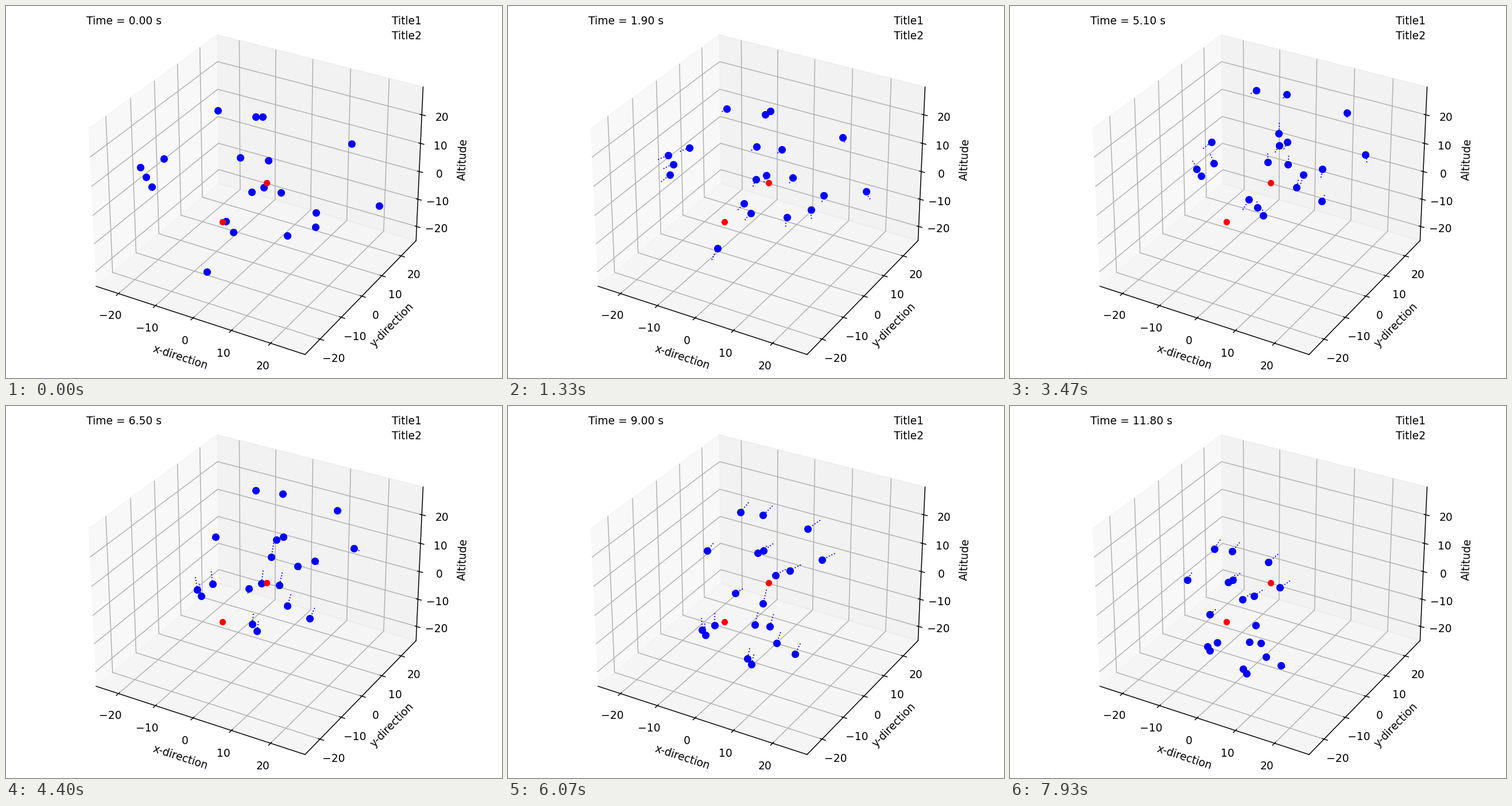
Recreate the animation shown at these times as a matplotlib script. Size 864 px wide and 648 px high, loop 8000 ms.

```python
import numpy as np
import matplotlib.pyplot as plt
from matplotlib.animation import FuncAnimation

WIDTH, HEIGHT, DPI = 864, 648, 135
LOOP_MS = 8000
SUBFRAMES = 2       # drawn frames per simulated step
STEPS = 120
STEP = 0.1          # simulated seconds
TRAIL_STEPS = 8
HALF_RANGE = 27.4
MIDDLE = (1.25, 0.57, 2.17)
WAYPOINT_TIMES = (0, 1.9, 3.7, 6.5, 9.0, 10.7, 11.8)


class Swarm:
    """Agents that share one smooth drift while their formation contracts."""

    def __init__(self, start, drift, decay):
        self.start = np.array(start, float)
        self.centre = self.start.mean(axis=0)
        # one polynomial per coordinate, through all waypoints
        waypoints = np.vstack([(0, 0), drift])
        self.path = np.polyfit(WAYPOINT_TIMES, waypoints,
                               len(WAYPOINT_TIMES) - 1)
        self.decay = decay

    def positions(self, t):
        drift = np.array([np.polyval(c, t) for c in self.path.T])
        rate, growth = self.decay
        spread = np.exp(-rate * t - growth * t * t)
        return self.centre + drift + spread * (self.start - self.centre)


swarms = [
    Swarm(start=[(369, 182), (447, 193), (602, 240), (449, 316), (428, 324),
                 (650, 348), (539, 385), (490, 400), (254, 315), (350, 463)],
          drift=[(0, -21), (19, -56), (31, -88),
                 (-8, -64), (-47, -31), (-66, -13)],
          decay=(0.0763, 0)),
    Swarm(start=[(435, 193), (408, 264), (457, 269), (275, 266), (234, 281),
                 (244, 298), (479, 325), (540, 360), (383, 375), (396, 394)],
          drift=[(28, -23), (44, -23), (45, 31),
                 (33, 99), (26, 125), (22, 125)],
          decay=(0.062, 0.001)),
]

# positions of every agent at every simulated step
history = np.array([np.vstack([swarm.positions(n * STEP) for swarm in swarms])
                    for n in range(STEPS)])

fig = plt.figure(figsize=(WIDTH / DPI, HEIGHT / DPI), dpi=DPI)
ax = fig.add_axes([0, 0, 1, 1], projection="3d")
names = ("x-direction", "y-direction", "Altitude")
for axis, name, mid in zip("xyz", names, MIDDLE):
    ax.set(**{f"{axis}lim": (mid - HALF_RANGE, mid + HALF_RANGE),
              f"{axis}ticks": range(-20, 21, 10),
              f"{axis}label": name})
clock = ax.text2D(0.05, 0.95, "", transform=ax.transAxes)
for y, title in ((0.95, "Title1"), (0.91, "Title2")):
    ax.text2D(0.95, y, title, transform=ax.transAxes, ha="right")

# stage in pixels, y pointing down
stage = fig.add_axes([0, 0, 1, 1])
stage.set(xlim=(0, WIDTH), ylim=(HEIGHT, 0))
stage.axis("off")
trails, = stage.plot([], [], ":", color="blue", lw=1)
dots, = stage.plot([], [], "o", color="blue")
stage.plot([454, 377], [308, 376], "o", color="red", ms=5)


def draw(frame):
    # the first step holds for two; each new step appears just ahead of its tick
    n = max(-(-frame // SUBFRAMES) - 1, 0)
    clock.set_text(f"Time = {n * STEP:.2f} s")
    dots.set_data(*history[n].T)
    # one broken line holds all trails, with a gap after each agent
    recent = history[max(n - TRAIL_STEPS, 0):n + 1]
    gap = np.full_like(recent[:1], np.nan)
    joined = np.concatenate([recent, gap]).swapaxes(0, 1).reshape(-1, 2)
    trails.set_data(*joined.T)
    return clock, dots, trails


frames = STEPS * SUBFRAMES
anim = FuncAnimation(fig, draw, frames=frames, interval=LOOP_MS / frames,
                     repeat=True, repeat_delay=0)
plt.show()
```
